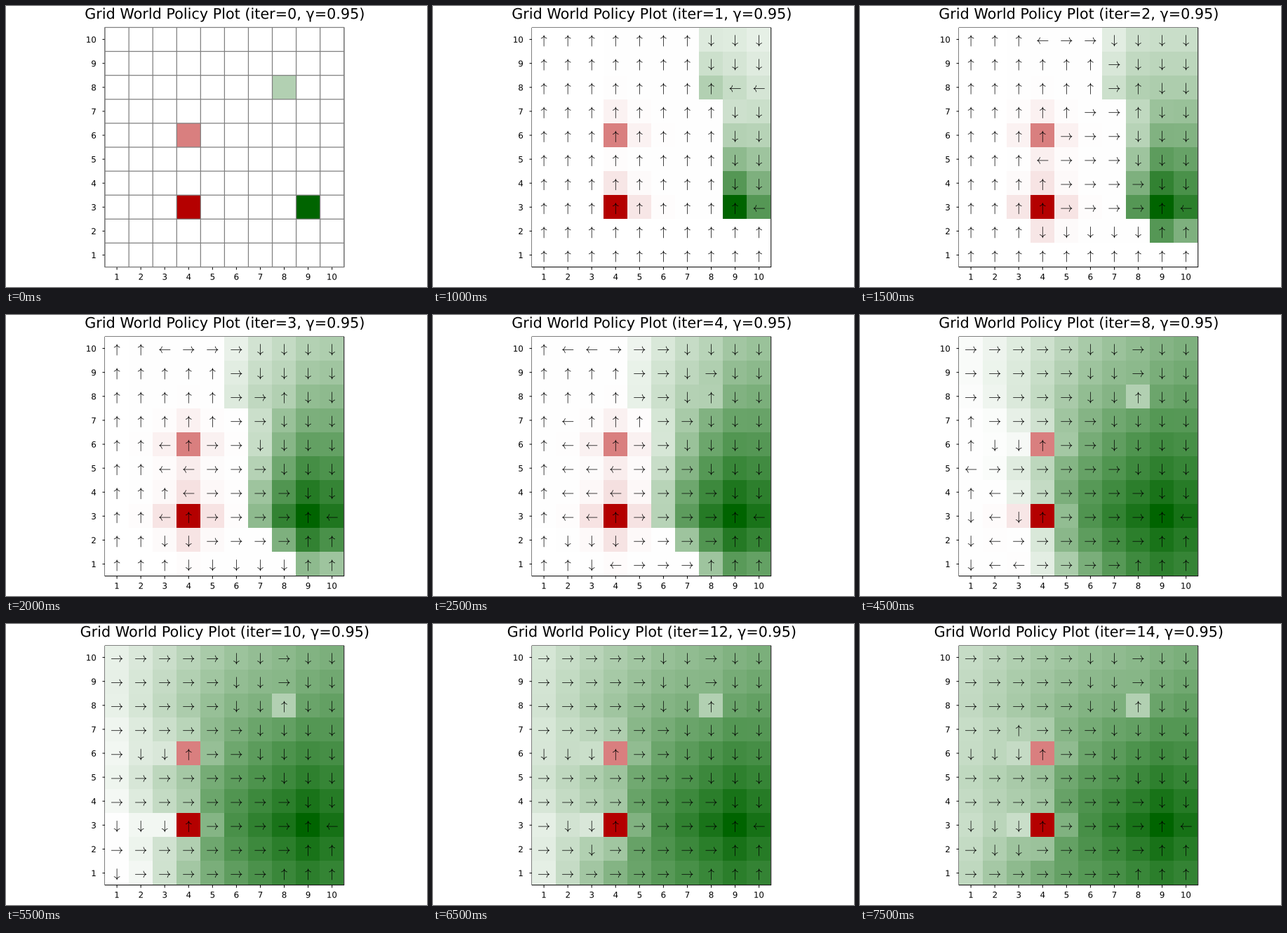
Write a matplotlib script that moves like this. It is 600 by 400 pixels and loops after 8 s.

```python
import numpy as np
import matplotlib.pyplot as plt
from matplotlib.animation import FuncAnimation
from matplotlib.patches import PathPatch, Rectangle
from matplotlib.textpath import TextPath
from matplotlib.transforms import Affine2D

plt.rcParams.update({"font.family": "DejaVu Sans", "mathtext.fontset": "cm"})

W, H, DPI = 600, 400, 100
PX = 72 / DPI  # points per pixel
N, GAMMA, P_MOVE = 10, 0.95, 0.7
STEPS = 16
REWARDS = {(4, 3): -10, (4, 6): -5, (9, 3): 10, (8, 8): 3}
MOVES = [(0, 1), (0, -1), (-1, 0), (1, 0)]
SYMBOLS = [r"$\uparrow$", r"$\downarrow$", r"$\leftarrow$", r"$\rightarrow$"]
CELLS = [(x, y) for y in range(1, N + 1) for x in range(1, N + 1)]
LOSS, GAIN = np.array([180, 0, 0]) / 255, np.array([0, 100, 0]) / 255


def outcomes(cell, action):
    """Successor cells with probabilities; walls add to staying put."""
    x, y = cell
    moved, total = [], 0.0
    for i, (dx, dy) in enumerate(MOVES):
        target = (x + dx, y + dy)
        if 1 <= target[0] <= N and 1 <= target[1] <= N:
            p = P_MOVE if i == action else (1 - P_MOVE) / (len(MOVES) - 1)
            moved.append((target, p))
            total += p
    return [(cell, 1 - total)] + moved


MODEL = {c: [outcomes(c, a) for a in range(4)] for c in CELLS}


def sweep(values, policy):
    """One in-place pass of value iteration."""
    for cell in CELLS:
        if cell in REWARDS:
            values[cell] = REWARDS[cell]
            continue
        best = -np.inf
        for action, successors in enumerate(MODEL[cell]):
            q = 0.0
            for target, p in successors:
                q += p * (GAMMA * values[target])
            if q > best:
                best, policy[cell] = q, action
        values[cell] = best


def solve(count):
    values, policy = dict.fromkeys(CELLS, 0.0), dict.fromkeys(CELLS, 0)
    history = [(dict(values), dict(policy))]
    for _ in range(count):
        sweep(values, policy)
        history.append((dict(values), dict(policy)))
    return history


def colours(values):
    img = np.ones((N, N, 3))
    for (x, y), v in values.items():
        t = min(abs(v) / 10, 1)
        img[N - y, x - 1] = (1 - t) + t * (GAIN if v > 0 else LOSS)
    return img


def cx(x):
    return 158.1 + 34.06 * (x - 1)


def cy(y):
    return 354.5 - 34.1 * (y - 1)


def glyphs(text, size, center_x=True, center_y=False):
    """Text outline with its ink centred on the chosen axes."""
    path = TextPath((0, 0), text, size=size)
    box = path.get_extents()
    dx = -(box.x0 + box.x1) / 2 if center_x else 0
    dy = -(box.y0 + box.y1) / 2 if center_y else 0
    return path.transformed(Affine2D().translate(dx, dy))


fig = plt.figure(figsize=(W / DPI, H / DPI), dpi=DPI, facecolor="white")
ax = fig.add_axes([0, 0, 1, 1])
ax.axis("off")


def line(xs, ys, color="black", width=1.0, z=1):
    return ax.plot(xs, ys, color=color, lw=width * PX, zorder=z,
                   snap=False, solid_capstyle="butt")[0]


def put(path, x, y):
    place = Affine2D().scale(1, -1).translate(x, y) + ax.transData
    return ax.add_patch(PathPatch(path, fc="black", lw=0, snap=False,
                                  transform=place, zorder=5))


ax.add_patch(Rectangle((141, 31), 340.75, 340.6, fill=False, ec="black",
                       lw=PX, snap=False, zorder=1))
heat = ax.imshow(np.ones((N, N, 3)), extent=(141, 481, 371, 31), aspect="auto",
                 interpolation="nearest", zorder=2)

outline = []
for i in range(N + 1):
    gx, gy = 141.1 + 34.06 * i, 371.5 - 34.1 * i
    outline.append(line([gx, gx], [30, 372], "gray", 1.25, 3))
    outline.append(line([140.6, 482.2], [gy, gy], "gray", 1.25, 3))

TICK_SIZE = 11.8
DIGIT = 0.636 * TICK_SIZE  # tabular digit advance
for k in range(1, N + 1):
    line([cx(k), cx(k)], [371.6, 375.5])
    line([137.5, 141], [cy(k), cy(k)])
    put(glyphs(str(k), TICK_SIZE), cx(k), 389.7)
    put(glyphs(str(k), TICK_SIZE, center_x=False),
        128.8 - DIGIT * len(str(k)), cy(k) + 4.5)

ARROWS = [glyphs(s, 18.3, center_y=True) for s in SYMBOLS]
arrows = {(x, y): put(ARROWS[0], cx(x), cy(y) + 1.8) for x, y in CELLS}


def heading(n):
    return glyphs(f"Grid World Policy Plot (iter={n}, γ={GAMMA})", 20.75)


title = put(heading(0), 311.5, 18.2)

ax.set_xlim(0, W)
ax.set_ylim(H, 0)

HISTORY = solve(STEPS - 2)


def draw(step):
    # The first step shows only the rewards on an outlined grid.
    intro = step == 0
    n = max(step - 1, 0)
    values, policy = HISTORY[n]
    heat.set_data(colours(REWARDS if intro else values))
    for item in outline:
        item.set_visible(intro)
    for cell, arrow in arrows.items():
        arrow.set_visible(not intro)
        arrow.set_path(ARROWS[policy[cell]])
    title.set_path(heading(n))
    return [heat, title, *outline, *arrows.values()]


anim = FuncAnimation(fig, draw, frames=STEPS, interval=500,
                     init_func=lambda: draw(0), repeat=True, repeat_delay=0)
plt.show()
```
